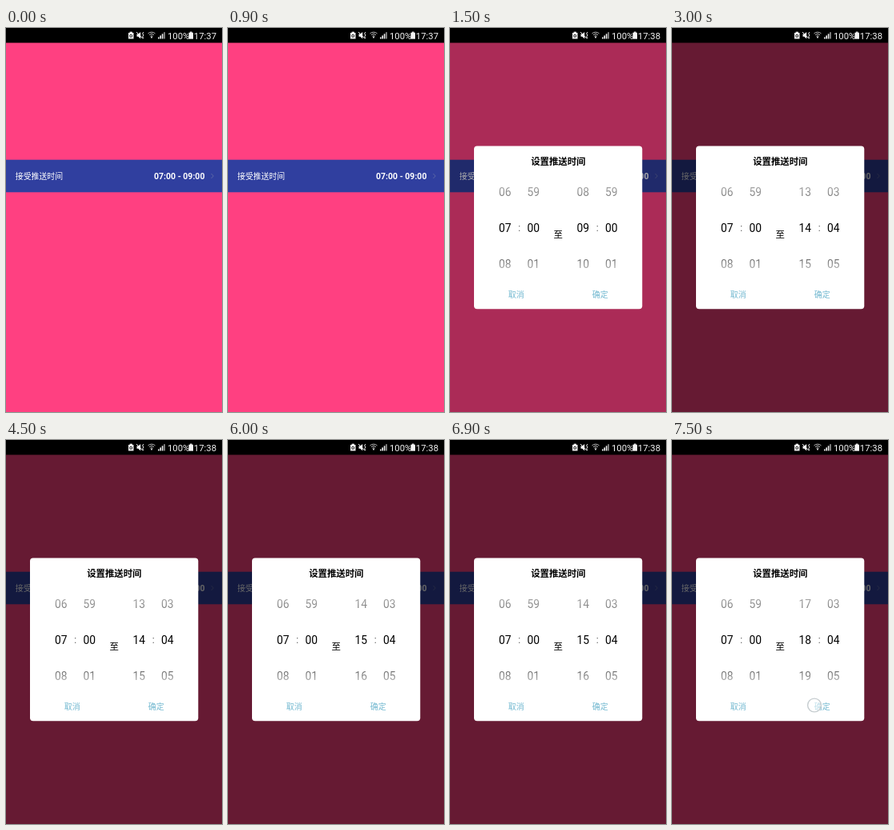
Animation of 270x480 px, one loop 8 s. Source, as an HTML page with a canvas:

```html
<!DOCTYPE html>
<html lang="zh-CN">
<head>
<meta charset="utf-8">
<title>推送时间</title>
<style>
html, body { margin: 0; width: 100%; height: 100%; overflow: hidden; background: #ff4081; }
canvas { display: block; width: 270px; height: 480px; }
</style>
</head>
<body>
<canvas id="stage"></canvas>
<script>
const W = 270, H = 480, LOOP = 8000;
const canvas = document.getElementById('stage');
const ratio = window.devicePixelRatio || 1;
canvas.width = W * ratio;
canvas.height = H * ratio;
const ctx = canvas.getContext('2d');
ctx.scale(ratio, ratio);

const LATIN = 'Roboto, sans-serif';
const CJK = '"Noto Sans CJK SC", "Noto Sans CJK", sans-serif';

// Each state holds until the next one starts.
const states = [
  { at: 0, clock: '17:37' },
  { at: 1500, clock: '17:38', dim: 0.33, end: [9, 0] },
  { at: 3000, clock: '17:38', dim: 0.6, end: [14, 4] },
  { at: 6000, clock: '17:38', dim: 0.6, end: [15, 4] },
  { at: 7500, clock: '17:38', dim: 0.6, end: [18, 4], touch: true }
];

function rect(x, y, w, h, color) {
  ctx.fillStyle = color;
  ctx.fillRect(x, y, w, h);
}

function text(str, x, y, size, color, { family = LATIN, weight = 400, align = 'left' } = {}) {
  ctx.font = `${weight} ${size}px ${family}`;
  ctx.textAlign = align;
  ctx.fillStyle = color;
  ctx.fillText(str, x, y);
}

function path(points, color, fill = true, width = 1) {
  ctx.beginPath();
  points.forEach(([x, y], i) => i ? ctx.lineTo(x, y) : ctx.moveTo(x, y));
  if (fill) {
    ctx.fillStyle = color;
    ctx.fill();
  } else {
    ctx.strokeStyle = color;
    ctx.lineWidth = width;
    ctx.stroke();
  }
}

function arc(x, y, r, from, to, color, width) {
  ctx.beginPath();
  ctx.arc(x, y, r, from, to);
  ctx.strokeStyle = color;
  ctx.lineWidth = width;
  ctx.stroke();
}

function statusBar(clock) {
  const ink = '#f4f4f4';
  rect(0, 0, W, 18.5, '#000');

  // Battery saver
  rect(153, 6, 6.5, 7.5, ink);
  rect(154.6, 4.7, 3.3, 1.4, ink);
  arc(156.2, 9.8, 1.5, 0, Math.PI * 2, '#000', 0.9);

  // Muted speaker
  path([[163.5, 7.6], [165.3, 7.6], [168.2, 5], [168.2, 13.4], [165.3, 10.8], [163.5, 10.8]], ink);
  path([[163, 5], [171, 13.3]], ink, false, 1);
  path([[172, 5], [170.6, 7], [172, 9], [170.6, 11], [172, 13]], ink, false, 1);

  // Wi-Fi
  [2.3, 4.6, 6.8].forEach(r => arc(182, 12, r, -Math.PI * 0.73, -Math.PI * 0.27, '#bbb', 1));
  path([[180.8, 10.8], [183.2, 10.8], [182, 13.3]], ink);

  // Signal
  for (let i = 0; i < 4; i++) {
    const h = 2 + i * 2.1;
    rect(190 + i * 2.4, 13.5 - h, 1.6, h, i < 3 ? ink : '#999');
  }

  text('100%', 202, 13.6, 11.3, ink);
  rect(228.4, 5.8, 5.6, 7.9, ink);
  rect(229.8, 4.6, 2.8, 1.3, ink);
  text(clock, 263, 13.6, 11.3, ink, { align: 'right' });
}

function page() {
  rect(0, 0, W, H, '#ff4081');
  rect(0, 164.7, W, 40.6, '#303f9f');
  text('接受推送时间', 11.8, 188.8, 9.9, '#fff', { family: CJK });
  text('07:00 - 09:00', 248.4, 188.7, 10.5, '#fff', { weight: 700, align: 'right' });
  path([[256.5, 182], [259.3, 185], [256.5, 188]], '#6872a8', false, 0.8);
}

function wheel(x, value, count) {
  for (let step = -1; step <= 1; step++) {
    const label = String((value + step + count) % count).padStart(2, '0');
    const y = 255.2 + step * 45;
    let ink = '#000';
    if (step) {
      ink = ctx.createLinearGradient(0, y - 10, 0, y);
      ink.addColorStop(0, step < 0 ? '#a2a2a2' : '#777');
      ink.addColorStop(1, step < 0 ? '#808080' : '#aaa');
    }
    text(label, x, y, 13.8, ink, { align: 'center' });
  }
}

function timePicker(x, [hour, minute]) {
  wheel(x, hour, 24);
  wheel(x + 35.5, minute, 60);
  text(':', x + 18, 254.3, 12, '#555', { align: 'center' });
}

function dialog({ end, touch }) {
  ctx.beginPath();
  ctx.roundRect(30, 147.5, 210.3, 203.7, 4);
  ctx.fillStyle = '#fff';
  ctx.fill();

  const label = { family: CJK, align: 'center' };
  text('设置推送时间', 135.3, 171.3, 11.4, '#000', { ...label, weight: 700 });
  timePicker(68.7, [7, 0]);
  timePicker(166.3, end);
  text('至', 135.2, 262, 11.4, '#000', label);
  text('取消', 82.7, 336.7, 10, '#72b8d0', label);
  text('确定', 187.7, 336.7, 10, '#72b8d0', label);

  if (touch) {
    ctx.beginPath();
    ctx.arc(178, 331.5, 8.4, 0, Math.PI * 2);
    ctx.fillStyle = 'rgba(255,255,255,0.55)';
    ctx.fill();
    arc(178, 331.5, 8.4, 0, Math.PI * 2, '#c6cdd0', 1.4);
  }
}

function draw(time) {
  const state = states.findLast(s => s.at <= time);
  page();
  if (state.end) {
    rect(0, 0, W, H, `rgba(0,0,0,${state.dim})`);
    dialog(state);
  }
  statusBar(state.clock);
}

const start = performance.now();
function tick() {
  draw((performance.now() - start) % LOOP);
  requestAnimationFrame(tick);
}
tick();
</script>
</body>
</html>
```
